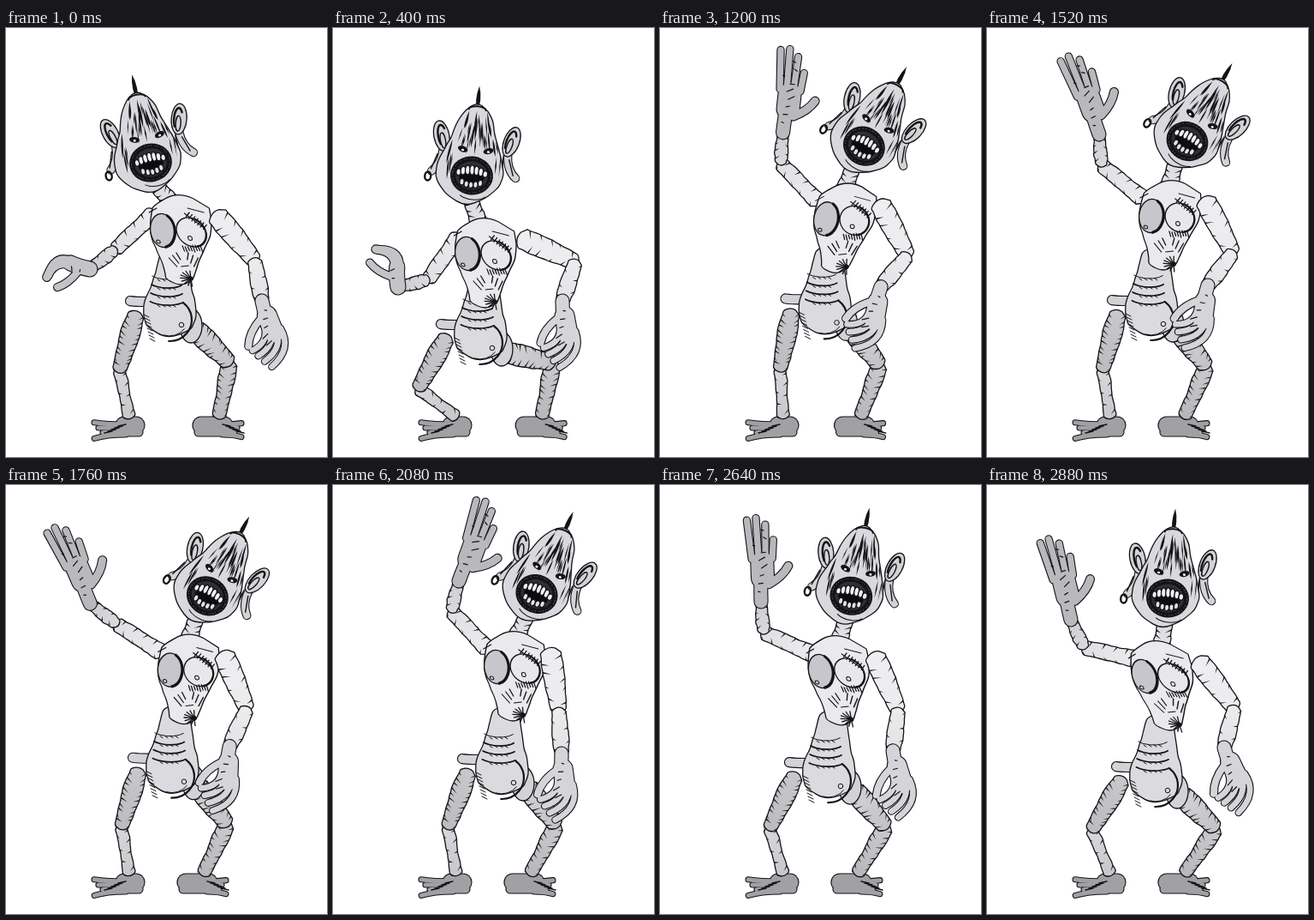
Recreate the animation shown at these times as an HTML page with a canvas. Size 375x500 px, loop 2.96 s.

```html
<!DOCTYPE html>
<html lang="en">
<head>
<meta charset="utf-8">
<title>Waving paper puppet</title>
<style>
html, body { margin: 0; width: 100%; height: 100%; overflow: hidden; background: #fff; }
canvas { display: block; }
</style>
</head>
<body>
<canvas id="stage" width="375" height="500"></canvas>
<script>
const ctx = document.getElementById('stage').getContext('2d');
const LOOP = 2960, STEP = 80, INK = '#141416', { PI, sin, cos, hypot, atan2 } = Math;

let seed = 7;
const rand = (lo, hi) => {
  seed = (seed * 16807) % 2147483647;
  return lo + (hi - lo) * seed / 2147483647;
};
const lerp = (a, b, u) => a + (b - a) * u;
const along = (list, u) => {
  const i = Math.min(list.length - 2, Math.floor(u * (list.length - 1)));
  return lerp(list[i], list[i + 1], u * (list.length - 1) - i);
};
const add = (p, x, y) => [p[0] + x, p[1] + y];

// ---- Shapes, all lying along the x axis ----

// Uneven cut-out strip; widths are half widths, skew shifts its middle line
function strip(len, widths, skew = [0, 0]) {
  const n = 14, up = [], down = [];
  for (let i = 0; i <= n; i++) {
    const u = i / n, w = along(widths, u), mid = along(skew, u);
    up.push([u * len, mid - w + rand(-0.6, 0.6)]);
    down.unshift([u * len, mid + w + rand(-0.6, 0.6)]);
  }
  const end = widths[widths.length - 1];
  const pts = [...up, [len + end * 0.5, skew[1]], ...down, [-widths[0] * 0.5, skew[0]]];
  const path = new Path2D();
  pts.forEach((p, i) => {
    const q = pts[(i + 1) % pts.length], mid = [(p[0] + q[0]) / 2, (p[1] + q[1]) / 2];
    if (i) path.quadraticCurveTo(...p, ...mid);
    else path.moveTo(...mid);
  });
  path.closePath();
  return path;
}

// Tapered pen strokes from both edges inward
function edgeTicks(len, widths, count) {
  const path = new Path2D();
  for (let i = 0; i < count; i++) {
    const u = (i + rand(0.1, 0.9)) / count, w = along(widths, u) - 0.3;
    const side = i % 2 ? 1 : -1, x = u * len, deep = rand(0.3, 0.9) * w;
    path.moveTo(x, side * w);
    path.lineTo(x + rand(2, 6), side * (w - deep));
    path.lineTo(x + 1.8, side * w);
  }
  return path;
}

// Pointed brush mark
function mark(path, x0, y0, x1, y1, w) {
  const mx = (x0 + x1) / 2, my = (y0 + y1) / 2;
  path.moveTo(x0, y0);
  path.quadraticCurveTo(mx - w, my, x1, y1);
  path.quadraticCurveTo(mx + w, my, x0, y0);
}

// Round-ended strand that leaves at one angle and ends bent
function strand(x, y, angle, len, bend, w) {
  const path = new Path2D(), c = len * 0.6, end = angle + bend;
  path.moveTo(x, y);
  path.quadraticCurveTo(x + c * cos(angle), y + c * sin(angle), x + len * cos(end), y + len * sin(end));
  return { path, w };
}

// ---- Drawing helpers ----
function ink(path, width) {
  ctx.lineWidth = width;
  ctx.strokeStyle = INK;
  ctx.stroke(path);
}
function fill(path, color) {
  ctx.fillStyle = color;
  ctx.fill(path);
}
function sheet(path, color) {
  fill(path, color);
  ink(path, 1.3);
}
function arc(x, y, rx, ry, turn = 0, from = 0, to = 2 * PI) {
  const path = new Path2D();
  path.ellipse(x, y, rx, ry, turn, from, to);
  return path;
}
function line(x0, y0, x1, y1, width = 1) {
  const path = new Path2D();
  path.moveTo(x0, y0);
  path.lineTo(x1, y1);
  ink(path, width);
}
// Joined outline: all edges first, then all fills
function merge(strands, color) {
  strands.forEach(s => ink(s.path, s.w + 2.2));
  ctx.strokeStyle = color;
  strands.forEach(s => { ctx.lineWidth = s.w; ctx.stroke(s.path); });
}
function frame([x, y], angle, paint) {
  ctx.save();
  ctx.translate(x, y);
  ctx.rotate(angle);
  paint();
  ctx.restore();
}

// ---- Limbs ----
function limb(len, widths, from, to, ticks) {
  const color = ctx.createLinearGradient(0, 0, len, 0);
  color.addColorStop(0, from);
  color.addColorStop(1, to);
  return { len, color, shape: strip(len, widths), ticks: edgeTicks(len, widths, ticks) };
}
function drawLimb(l, a, b) {
  const dx = b[0] - a[0], dy = b[1] - a[1];
  frame(a, atan2(dy, dx), () => {
    ctx.scale(hypot(dx, dy) / l.len, 1);
    sheet(l.shape, l.color);
    fill(l.ticks, INK);
  });
}
// Middle joint of two bones reaching from a to b
function bendJoint(a, b, l1, l2, side) {
  const dx = b[0] - a[0], dy = b[1] - a[1], d = Math.min(hypot(dx, dy), l1 + l2 - 0.1);
  const angle = atan2(dy, dx) + side * Math.acos((l1 * l1 + d * d - l2 * l2) / (2 * l1 * d));
  return add(a, l1 * cos(angle), l1 * sin(angle));
}
function drawPair(pair, a, b) {
  const mid = bendJoint(a, b, pair.upper.len, pair.lower.len, pair.side);
  if (pair.foldUnder) drawLimb(pair.lower, mid, b);
  drawLimb(pair.upper, a, mid);
  if (!pair.foldUnder) drawLimb(pair.lower, mid, b);
}

const legL = { side: 1, foldUnder: true, upper: limb(69, [9, 12, 10, 8], '#c8c8cc', '#bcbcc0', 22),
  lower: limb(55, [7, 7, 6, 7], '#d8d8dc', '#c8c8cc', 8) };
const legR = { side: -1, foldUnder: true, upper: limb(56, [12, 13, 11, 9], '#d2d2d6', '#c4c4c8', 18),
  lower: limb(64, [9, 10, 8, 8], '#cacace', '#b8b8bc', 18) };
const armL = { side: -1, upper: limb(62, [10, 9, 9, 8], '#ececf0', '#e0e0e4', 9),
  lower: limb(36, [6, 8, 7, 6], '#dadade', '#ceced2', 7) };
const armR = { side: -1, upper: limb(69, [12, 13, 11, 9], '#eeeef2', '#ececef', 10),
  lower: limb(48, [8, 9, 10, 8], '#ececef', '#e2e2e6', 6) };
const neck = limb(36, [9, 9, 10, 14], '#dcdce0', '#e6e6ea', 12);

// ---- Hands and feet ----
const fingers = (count, make) => Array.from({ length: count }, (_, i) => make(i));

const openHand = [
  strand(0, 0, 0, 30, 0.05, 15), strand(28, 3, 0, 17, 0, 26), strand(20, 10, 1.1, 31, -0.25, 9),
  ...fingers(4, i => strand(50, -9 + 8 * i, (i - 1.5) * 0.06, 48 - 5 * (i - 0.7) ** 2, 0, 7.2))
];
const claw = [
  strand(0, 0, 0.2, 24, 0.1, 17), strand(14, -3, -0.9, 30, 0.25, 8),
  ...fingers(2, i => strand(24, 5 + 5 * i, 0.35, 30, -0.85 - 0.1 * i, 9))
];
const restingHand = [
  strand(0, 0, 0, 20, 0, 15), strand(18, -2, -0.15, 22, 0, 22), strand(20, 6, 0.95, 35, -0.3, 8),
  ...fingers(4, i => strand(36 - 2 * i, -14 + 6 * i, -0.3 + 0.08 * i, 46 - 5 * i, 0.75, 6.6))
];
const creases = fingers(9, i => [12 + 9 * i, rand(-8, 8), rand(-3, 5), rand(2, 7)]);

function drawHand(hand, at, angle, color, wrinkles) {
  frame(at, angle, () => {
    merge(hand, color);
    creases.slice(0, wrinkles).forEach(([x, y, dx, dy]) => line(x, y, x + dx, y + dy, 1.2));
  });
}

function foot(dir, heel, reach) {
  const turn = dir < 0 ? PI : 0;
  return [
    strand(-dir * (heel - 10), 10, turn, heel - 4, 0, 19),
    strand(-dir * (heel - 7), 18, turn, heel + 9, 0, 9),
    ...fingers(4, i => strand(dir * 4, 9 + 4 * i, turn, reach - 7 - 5 * (i % 3), -dir * 0.06 * (1 - i), 5))
  ];
}
const footL = foot(-1, 18, 44), footR = foot(1, 31, 29);
function drawFoot(strands, at, dir) {
  frame(at, 0, () => {
    merge(strands, '#a0a0a5');
    for (let i = 0; i < 5; i++) line(dir * (4 + 4 * i), 9 + 2 * i, dir * (13 + 4 * i), 11 + 2 * i, 1.4);
  });
}

// ---- Head ----
const face = strip(106, [9, 20, 23, 27, 33, 38, 40, 35, 21], [0, 4]);
const streaks = new Path2D();
for (let i = 0; i < 34; i++) {
  const x = lerp(-33, 35, (i * 0.618) % 1), outer = Math.abs(x) > 25;
  const y0 = outer ? rand(-45, -15) : rand(-76, -44), y1 = outer ? y0 + rand(14, 30) : Math.min(-24, y0 + rand(14, 28));
  const fan = y => x * lerp(0.45, 1, Math.min(1, (y + 80) / 55)) + 2;
  mark(streaks, fan(y0), y0, fan(y1), y1, rand(0.9, 2.4));
}

function drawEar(side) {
  const x = side * 41 + 2;
  merge([strand(side * 38 + 2, -28, PI / 2, 29, -side * 0.4, 8)], '#d2d2d7');
  sheet(arc(x, -43, 9, 18, side * 0.28), '#d2d2d7');
  ink(arc(x - side, -43, 5, 13, side * 0.28, 2.4, 5.6), 2.4);
  ink(arc(x - side * 2, -38, 3, 9, side * 0.28), 1.4);
  line(side * 42, -22, side * 48, -4, 1.4);
}
function drawMouth() {
  fill(arc(0, 0, 25, 22.5), INK);
  for (let i = 0; i < 40; i++) fill(arc(22.5 * cos(i * 2.4), 20 * sin(i * 2.4), 0.6, 0.6), '#66666b');
  fill(arc(0, 0, 19, 16.5), '#303034');
  fill(arc(0, 3, 15, 5), '#0c0c0e');
  for (let i = -3; i <= 3; i++) {
    sheet(arc(i * 5.2, -6.5 + i * i * 0.4, 2.8, 5.6 - i * i * 0.2), '#f0f0f3');
    if (Math.abs(i) < 3) sheet(arc(i * 5.4, 11 - i * i * 0.7, 2.6, 3.8), '#e2e2e6');
  }
}
function drawHead(at, tilt) {
  frame(at, tilt, () => {
    drawEar(-1);
    drawEar(1);
    ink(arc(-51, 5, 3.5, 5), 2.4);
    const spike = new Path2D();
    mark(spike, 0, -105, 0, -72, 5);
    fill(spike, INK);
    for (let y = -97; y < -86; y += 4) line(-1, y, 1.5, y - 1, 0.5);
    frame([0, -80], PI / 2, () => sheet(face, '#d8d8de'));
    fill(streaks, INK);
    ink(arc(0, -77, 10, 4, 0, PI, 2 * PI), 2);
    for (const side of [-1, 1]) {
      fill(arc(side * 15 + 2, -30, 6, 3.4, -side * 0.3), INK);
      fill(arc(side * 15 + 2, -29, 1.6, 1.3), '#fff');
    }
    drawMouth();
    ink(arc(3, 18, 18, 10, 0, 0.6, 2.5), 1);
  });
}

// ---- Trunk ----
const ribs = strip(86, [33, 36, 35, 28, 20, 16], [-11, 10]);
const belly = strip(88, [15, 18, 21, 25, 30, 31, 26], [0, 0]);

function drawChest(at, lean) {
  frame(at, 0, () => {
    ctx.transform(1, 0, lean, 1, 0, 0);
    frame([0, -29], PI / 2, () => sheet(ribs, '#e9e9ee'));
    sheet(arc(16, 2, 17, 17, 0.5), '#e8e8ec');
    sheet(arc(-17, 0, 14, 20, 0.3), '#c6c6cc');
    ink(arc(-17, 0, 14, 20, 0.3, -1.3, 1.2), 3.2);
    ink(arc(16, 2, 17, 17, 0.5, -1.6, 0.9), 2.2);
    ink(arc(-25, 13, 2.2, 2), 1);
    ink(arc(13, 9, 2.4, 2.4), 1);
    line(13, -20, 32, -3, 1.2);
    for (let i = 0; i < 7; i++) line(14 + 2.8 * i, -16 + 2.4 * i, 19 + 2.8 * i, -21 + 2.4 * i, 1.2);
    for (let i = 0; i < 8; i++) line(2 + 3 * i, 18 + sin(i), 3 + 3 * i, 24 + sin(i * 2), 1.3);
    for (const side of [-1, 1]) {
      for (let i = 0; i < 3; i++) line(side * (7 + 5 * i), 26 + 3 * i, side * (4 + 3 * i), 34 + 4 * i, 1.3);
      line(side * 18, -26, side * 32 + 4, -21);
    }
    line(-5, 42, 4, 41);
    for (let i = 0; i < 9; i++) line(3, 56, 3 + 12 * cos(1.6 + i * 0.4), 56 + 9 * sin(1.6 + i * 0.4), 1.3);
    fill(arc(3, 56, 2.8, 2.8), INK);
  });
}
function drawPelvis(at) {
  frame(at, 0, () => {
    sheet(arc(11, 1, 13, 20), '#d2d2d7');
    merge([strand(-42, -27, PI, 18, 0.05, 10)], '#d2d2d7');
    frame([-9, -84], PI / 2 + 0.07, () => sheet(belly, '#dadadf'));
    for (let i = 0; i < 4; i++) {
      ink(arc(-18, -61 + 10 * i, 20 + i, 8, 0.05, 0.5, 2.5), i ? 1.7 : 1);
      for (let j = 0; j < 4; j++) line(-28 + 6 * j, -53 + 10 * i, -25 + 6 * j, -51 + 10 * i);
    }
    ink(arc(-14, -6, 26, 25, 0, -0.9, 1.6), 2.2);
    ink(arc(-14, -6, 21, 19, 0, 0.6, 1.9), 1);
    for (let i = 0; i < 8; i++) line(-44 + i, -12 + 4 * i, -38 + i, -9 + 4 * i);
    ink(arc(0, 0, 2.8, 2.8), 1);
  });
}

// ---- Motion: key rows of time and values ----
const keys = s => s.split('|').map(row => row.trim().split(' ').map(Number));
const motion = {
  head: keys('0 169 157 -12|400 162 172 5|800 220 142 10|1280 240 137 31|1520 234 132 30|2080 238 127 24|2400 234 127 18|2880 211 132 5'),
  chest: keys('0 200 236 .23|400 174 263 .22|800 208 231 .05|1520 209 219 .11|2080 208 212 .2|2400 208 212 .2|2880 201 223 .37'),
  pelvis: keys('0 205 346|400 186 373|800 205 346|1520 206 345|2080 211 347|2400 211 347|2880 211 356'),
  handR: keys('0 299 318 77|400 268 318 88|800 261 308 106|1520 258 300 106|2080 267 313 91|2400 268 313 88|2880 277 306 73'),
  handL: keys('0 98 281 180|240 80 295 207|400 76 302 250|800 117 171 274|1160 143 124 278|1520 131 124 250|1680 92 142 238|2080 147 112 290|2400 136 118 279|2880 98 157 256')
};

// Cubic interpolation through the key rows
function sample(rows, now) {
  const last = rows.length - 1;
  let i = 0;
  while (i < last - 1 && now >= rows[i + 1][0]) i++;
  const span = rows[i + 1][0] - rows[i][0], u = (now - rows[i][0]) / span;
  const slope = (j, k) => {
    const a = rows[Math.max(0, j - 1)], b = rows[Math.min(last, j + 1)];
    return (b[k] - a[k]) / (b[0] - a[0]) * span;
  };
  return rows[i].slice(1).map((a, c) => {
    const k = c + 1, b = rows[i + 1][k], m = slope(i, k), n = slope(i + 1, k);
    return a + u * (m + u * (3 * (b - a) - 2 * m - n + u * (2 * (a - b) + m + n)));
  });
}

function render(now) {
  const rad = PI / 180, pose = {};
  for (const name in motion) pose[name] = sample(motion[name], now);
  const { head, chest, pelvis, handL, handR } = pose;
  const tilt = head[2] * rad;
  const ankleL = [144, 453], ankleR = [249 - 18 * Math.min(1, now / 1500), 453];

  ctx.fillStyle = '#fff';
  ctx.fillRect(0, 0, 375, 500);
  ctx.lineJoin = ctx.lineCap = 'round';
  drawFoot(footL, ankleL, -1);
  drawFoot(footR, ankleR, 1);
  drawPair(legL, add(pelvis, -53, -13), ankleL);
  drawPair(legR, add(pelvis, 16, 5), ankleR);
  drawPelvis(pelvis);
  drawLimb(neck, add(head, -25 * sin(tilt), 25 * cos(tilt)), add(chest, 1, -24));
  drawPair(armL, add(chest, -27, -20), handL);
  drawChest(chest, chest[2]);
  drawPair(armR, add(chest, 46, -18), handR);
  drawHand(restingHand, handR, handR[2] * rad, '#d4d4d9', 5);
  if (now < 920) drawHand(claw, handL, handL[2] * rad, '#c4c4c8', 2);
  else drawHand(openHand, handL, handL[2] * rad, '#b8b8bd', 9);
  drawHead(head, tilt);
}

const start = performance.now();
function tick() {
  const t = (performance.now() - start) % LOOP;
  render(Math.floor(t / STEP) * STEP);
  requestAnimationFrame(tick);
}
tick();
</script>
</body>
</html>
```
